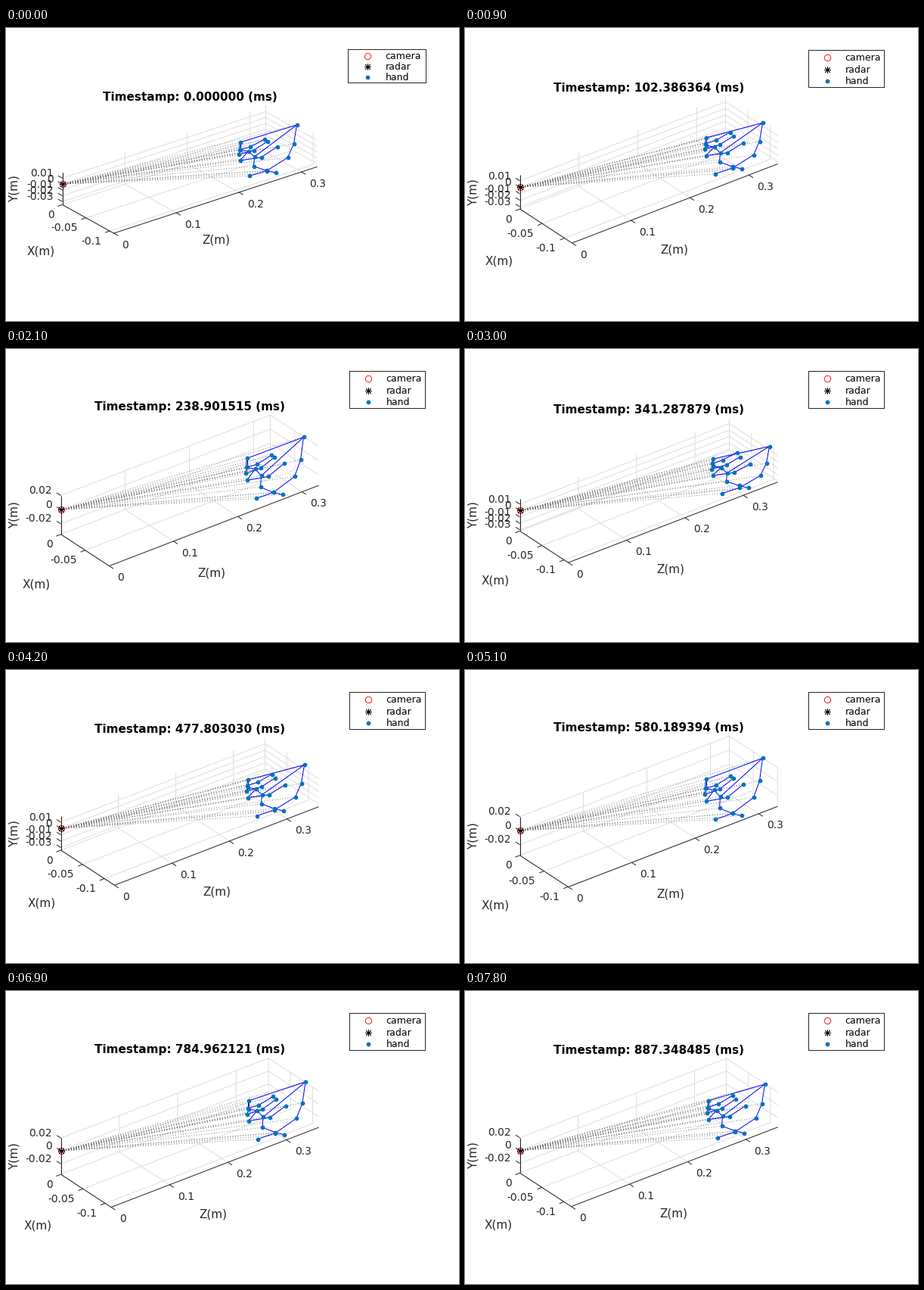
Recreate the animation shown at these times as a matplotlib script. Size 599 by 387 pixels, loop 8000 ms.

```python
import numpy as np
import matplotlib.pyplot as plt
from matplotlib.animation import FuncAnimation
from matplotlib.collections import LineCollection

W, H, DPI = 599, 387, 100
PX = 72 / DPI
STEP_MS = 1126.25 / 33
LAST_STEP = 26
INK, HAND = "#262626", "#0072bd"

# Slopes of the projected X and Z axes, and the height the plot is centred on.
X_SLOPE, Z_SLOPE, MID_Y = 0.652, -0.384, 186.5

# step, curl of the hand, pixels per 0.1 m of depth, front corner x, wrist x
MOTION = np.array([
    (0, 0.1, 82.7, 143, 385),
    (3, 0.8, 78, 142, 394),
    (7, 0, 85, 137, 394),
    (10, 1.1, 77.2, 137, 403),
    (14, 0.8, 76, 144, 395),
    (17, 0, 84, 137, 394),
    (20, 0.05, 77.5, 138, 396),
    (26, 0.6, 77, 141, 397),
])

# The open hand relative to the wrist: thumb to little finger, knuckle to tip.
FINGERS = np.array([
    [(-4, 30), (-12, 52), (-40, 73), (-63, 81)],
    [(-56, 51), (-57, 66), (-40, 73), (-28, 76)],
    [(-64, 42), (-75, 57), (-47, 52), (-26, 35)],
    [(-75, 40), (-77, 48), (-57, 41), (-39, 27)],
    [(-75, 28), (-76, 40), (-62, 36), (-43, 24)],
], float)

BONES = [(0, 1), (0, 5), (0, 17), (5, 9), (9, 13), (13, 17)]
BONES += [(j, j + 1) for base in range(1, 21, 4) for j in range(base, base + 3)]

plt.rcParams["font.family"] = "DejaVu Sans"
fig = plt.figure(figsize=((W + 1e-6) / DPI, (H + 1e-6) / DPI), dpi=DPI, facecolor="white")
ax = fig.add_axes([0, 0, 1, 1])


def lines(segments, color, width=1, style="solid", z=1):
    ax.add_collection(LineCollection(segments, colors=color, linewidths=width * PX,
                                     linestyles=style, zorder=z))


def text(x, y, s, size=10, ha="center", color=INK, **kw):
    """Place text so that its capitals are centred on y."""
    ax.text(x, y + 0.46 * size, s, size=size, ha=ha, va="baseline", color=color, **kw)


def camera(x, y):
    ax.plot(x, y, "o", ms=8.4 * PX, mfc="none", mec="red", mew=0.9 * PX, zorder=6)


def radar(x, y):
    ax.plot(x, y, marker=(8, 2, 0), ms=9 * PX, mec="black", mew=0.9 * PX, zorder=7)


def joints(x, y):
    ax.plot(x, y, ".", ms=11.5 * PX, color=HAND, mew=0, ls="none", zorder=5)


def hand_points(curl, wrist_x, flat):
    """Curling squeezes the hand and lifts the outer fingertips."""
    finger, joint = np.mgrid[0:5, 1:5]
    pts = FINGERS.copy()
    pts[..., 1] *= 1 - 0.3 * curl
    pts[..., 1] += 0.9 * curl * (2 - finger) * joint
    wrist_y = 116 + 11 * curl
    pts = np.vstack([(0, 0), pts.reshape(-1, 2)]) + (wrist_x, wrist_y)
    pts[:, 1] = MID_Y + (pts[:, 1] - MID_Y) * flat
    return pts


def legend(compact):
    x0, x1, y0, y1 = (452, 555, 28, 72) if compact else (454, 554, 29, 78)
    gap = (y1 - y0) * 0.318
    lines([[(x0, y0), (x1, y0), (x1, y1), (x0, y1), (x0, y0)]], INK)
    x = 478 if compact else 479
    for i, (name, mark) in enumerate([("camera", camera), ("radar", radar), ("hand", joints)]):
        y = (y0 + y1) / 2 + (i - 1) * gap + 0.7
        mark(x, y)
        text(x + 24, y, name, 9, "left", "black")


def draw_axes(left, right, corner, unit, height, flat, coarse):
    """Draw the box with ticks and labels; return the sensor's place and the top."""
    across = np.array([corner - left, (corner - left) * X_SLOPE * flat])
    depth = np.array([right - corner, (right - corner) * Z_SLOPE * flat])
    rise = np.array([0, -height * flat])
    bottom = MID_Y + (across[1] - depth[1] - rise[1]) / 2
    front = np.array([corner, bottom])
    origin = front - across
    sensor = origin + 0.64 * rise

    per_x, per_y = 0.379 * unit, 0.11 * unit * flat
    x_ticks = [origin + across * d / across[0] for d in np.arange(0, across[0], per_x)]
    z_ticks = [front + depth * d / depth[0] for d in np.arange(0, depth[0], unit)]
    y_values = (2, 0, -2) if coarse else (1, 0, -1, -2, -3)
    y_ticks = [sensor - (0, v * per_y) for v in y_values]

    grid = []
    for p in x_ticks:
        grid.append((p, p + depth, p + depth + rise))
    for p in z_ticks:
        grid.append((p, p - across, p - across + rise))
    for p in y_ticks:
        grid.append((p, p + depth, p + depth + across))
    lines(grid, "#dfdfdf")

    out_x = 6.5 * across / np.hypot(*across)
    out_z = 6.5 * depth / np.hypot(*depth)
    edges = [(origin, origin + rise), (origin, front), (front, front + depth)]
    edges += [(p, p - out_z) for p in x_ticks]
    edges += [(p, p + out_x) for p in z_ticks]
    edges += [(p, p - out_x) for p in y_ticks]
    lines(edges, INK, z=2)

    for i, (x, y) in enumerate(x_ticks):
        text(x - 11, y + 13, f"{-0.05 * i:g}" if i else "0", ha="right")
    for i, (x, y) in enumerate(z_ticks):
        text(x + 11, y + 15, f"{0.1 * i:.1f}" if i else "0", ha="left")
    for v, (x, y) in zip(y_values, y_ticks):
        text(x - 11.5, y - 7, f"{v / 100:g}", ha="right")

    text(corner - 96.5, bottom + 23.4, "X(m)", 11)
    text(corner + 135, bottom + 8.5, "Z(m)", 11)
    ax.text(16, origin[1] + rise[1] / 2, "Y(m)", size=11, color=INK, rotation=90,
            rotation_mode="anchor", ha="center", va="baseline")
    return sensor, (origin + depth + rise)[1]


def draw(frame):
    step = min(frame // 3, LAST_STEP)
    ax.clear()
    ax.set_axis_off()
    ax.set_xlim(0.5, W + 0.5)
    ax.set_ylim(H - 0.5, -0.5)

    # The opening view is flatter and has a smaller legend.
    opening = step == 0
    flat = 0.85 if opening else 1
    left, right = (75, 412) if opening else (73, 414)
    curl, unit, corner, wrist_x = (np.interp(step, MOTION[:, 0], track)
                                   for track in MOTION[:, 1:].T)

    coarse = curl < 0.7 and not opening
    sensor, top = draw_axes(left, right, corner, unit, 51 - 8 * curl, flat, coarse)
    text(243.5, top - 11.5, f"Timestamp: {step * STEP_MS:.6f} (ms)", 11,
         color="black", weight="bold")

    hand = hand_points(curl, wrist_x, flat)
    lines([(sensor, p) for p in hand], "#686868", 0.85, (0, (1.1, 2.9)), 3)
    lines([(hand[a], hand[b]) for a, b in BONES], "blue", z=4)
    joints(*hand.T)
    camera(*sensor)
    radar(*sensor)
    legend(opening)
    return []


anim = FuncAnimation(fig, draw, frames=80, interval=100, repeat=True, repeat_delay=0,
                     init_func=lambda: draw(0), blit=False)
plt.show()
```
